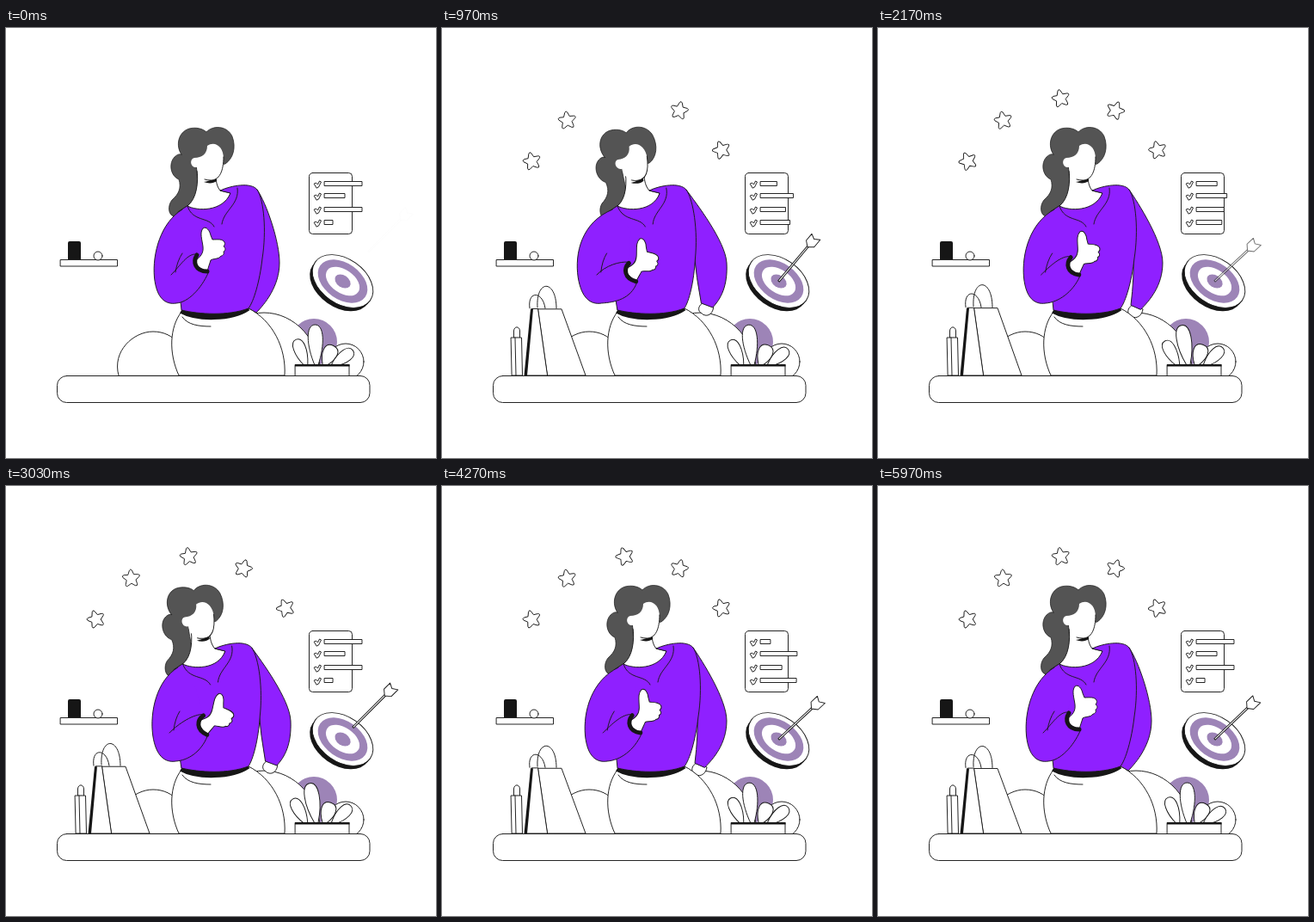
Write an HTML page that moves like this. It is 500 px wide and 500 px high and loops after 6 s.

```html
<!DOCTYPE html>
<html>
<head>
<meta charset="utf-8">
<style>
html, body { margin: 0; width: 100%; height: 100%; overflow: hidden; background: #fff; }
svg { display: block; width: 100vw; height: 100vh; }
svg * { stroke-linejoin: round; stroke-linecap: round; }
.w { fill: #fff; stroke: #1a1a1a; stroke-width: .95; }
.l { fill: none; stroke: #1a1a1a; stroke-width: .95; }
.p { fill: #8f20ff; stroke: #1a1a1a; stroke-width: .95; }
.pf { fill: #8f20ff; }
.h { fill: #545454; stroke: #1a1a1a; stroke-width: .7; }
.k { fill: #161616; }
.v { fill: #9d84b7; }
</style>
</head>
<body>
<svg viewBox="0 0 500 500">
  <!-- backdrop -->
  <path class="w" d="M131 404C123 376 148 353 171 353C196 353 213 374 211 404Z"/>
  <circle class="v" cx="358" cy="365" r="27"/>
  <path class="w" d="M234 405A66 74 0 0 1 366 405Z"/>
  <circle class="w" cx="395" cy="388" r="21"/>

  <!-- shelf -->
  <rect class="w" x="63.5" y="269.5" width="66" height="7.5"/>
  <path class="k" d="M72 269V250Q72 248 74 248H85Q87 248 87 250V269Z"/>
  <circle class="w" cx="107" cy="265" r="5"/>

  <!-- checklist -->
  <rect class="w" x="352.5" y="168.5" width="50" height="71" rx="4"/>
  <g id="rows"></g>

  <!-- dartboard -->
  <g transform="translate(391.5 294.5) rotate(35)">
    <ellipse class="k" cx="-.2" cy="5" rx="39" ry="26"/>
    <ellipse class="w" rx="39" ry="26"/>
    <ellipse class="v" rx="32" ry="21"/>
    <ellipse fill="#fff" rx="22" ry="13.5"/>
    <ellipse class="v" rx="10" ry="7"/>
  </g>
  <g id="arrow">
    <rect class="w" y="-1" width="56" height="2"/>
    <path class="w" d="M52 0L57 -6L67 -6L64 0L68 6L57 6Z"/>
  </g>

  <g id="stars"></g>

  <g id="bottle">
    <path class="w" d="M83.5 -44V-52C84 -57.5 90 -57.5 90.5 -52V-44Z"/>
    <path class="w" d="M80.5 -44H92.5L93.5 0H81.5Z"/>
    <path class="l" d="M85 -44L86 0"/>
  </g>
  <g id="bag">
    <path class="w" d="M104 -75L97 0H123L112 -75Z"/>
    <path class="w" d="M112 -75H139L167 0H123Z"/>
    <path class="k" d="M103 -75L95.5 0H99L106 -75Z"/>
    <path class="l" d="M102 -76C99 -96 117 -96 120 -76M111 -77C109 -109 133 -109 133 -76"/>
  </g>

  <!-- person -->
  <g class="lean">
    <g class="head">
      <path class="h" d="M204 147C197 137 200 121 213 117C221 115 229 117 233 121C240 113 257 113 263 126C268 139 264 152 255 158L222 165C222 180 227 196 214 206C208 212 202 219 196 219C188 218 188 206 193 200C201 193 204 186 201 176C191 172 189 157 196 150C199 147 202 146 204 147Z"/>
    </g>
    <path class="w" id="fist"/>
    <path class="p" id="rightArm"/>
  </g>
  <path class="w" d="M204 330C190 348 189 378 201 404H324C326 372 310 340 282 326Z"/>
  <path class="l" d="M205 336C211 345 224 347 238 347"/>
  <path fill="none" stroke="#161616" stroke-width="8" style="stroke-linecap:butt" d="M204 328C222 338 262 338 281 325"/>
  <g class="lean">
    <path class="w" d="M222 162C224 180 222 198 211 207C222 217 255 214 261 192L249 189C245 184 244 178 244 170Z"/>
    <path class="p" d="M211 207C222 213 252 214 261 192L249 189C262 183 285 179 292 188C300 200 303 236 298 268C295 295 288 318 282 326C258 335 225 333 204 328L203 318C190 280 195 225 200 214Z"/>
    <path class="l" d="M269 186C272 205 253 212 251 228M211 207C217 226 236 219 242 231"/>
    <g class="head">
      <path class="k" d="M230 179C238 178 243 175 245 169V178C241 181 235 181 230 179Z"/>
      <path fill="#fff" d="M234 137C243 131 253 138 253 152C253 167 248 177 238 177C228 177 222 170 222 162C214 163 213 152 219 151C228 151 234 146 234 137Z"/>
      <path class="l" d="M253 150C253 167 248 177 238 177Q234 177 231 176"/>
    </g>
    <path class="pf" id="sleeve"/>
    <path class="l" id="sleeveLine"/>
    <path class="l" id="folds"/>
    <g id="hand">
      <path class="w" d="M221 270C226 266 230 262 229 254C228 246 225 238 229 233C233 230 237 236 238 241L240 246C246 246 252 245 254 249C255 251 254 253 253 254C256 256 255 259 253 260C254 263 252 265 250 265C248 269 240 268 238 270C237 274 235 278 234 284L221 276Z"/>
      <path fill="none" stroke="#161616" stroke-width="5" d="M222 264C217 272 220 283 234 283"/>
    </g>
  </g>

  <!-- plant and table -->
  <g id="leaves"></g>
  <rect class="w" x="336.5" y="391.5" width="62.5" height="14"/>
  <path class="k" d="M336 391H399.5V393.5H336Z"/>
  <rect class="w" x="59.5" y="404.5" width="363.5" height="31" rx="11"/>
</svg>
<script>
const LOOP = 6000;
const $ = id => document.getElementById(id);
const set = (el, attrs) => { for (const k in attrs) el.setAttribute(k, attrs[k]); return el; };
const make = (parent, tag, attrs) =>
  parent.appendChild(set(document.createElementNS('http://www.w3.org/2000/svg', tag), attrs));
const clamp = x => Math.max(0, Math.min(1, x));
const wave = (t, period) => (1 - Math.cos(t / period * 2 * Math.PI)) / 2;
const backOut = x => { const u = clamp(x) - 1; return 1 + u * u * (2.2 * u + 1.2); };

// time, lean, elbow dx, hand dx, hand dy, hand turn, right arm reach
const poses = [
  [0, 1, 0, 0, 0, 0, 0],
  [970, 0, -12, 0, 14, 14, 1],
  [2170, 1, -3, 3, 5, 7, .6],
  [3030, .22, 0, 12, 11, 24, 1],
  [4270, 1, -6, 0, 5, 7, .6],
  [5270, .44, -8, 0, 9, 11, 0],
  [5970, 1, 0, 0, 0, 0, 0],
  [LOOP, 1, 0, 0, 0, 0, 0]
];
function poseAt(t) {
  const i = poses.findIndex(p => p[0] > t), a = poses[i - 1], b = poses[i];
  const f = wave((t - a[0]) / (b[0] - a[0]), 2);
  return a.map((v, j) => v + (b[j] - v) * f);
}

// y, bar end at rest, bar end at mid cycle
const bars = [[181, 414, 380], [195, 394, 414], [211, 414, 394], [226, 380, 414]].map(([y, from, to]) => {
  make($('rows'), 'path', { class: 'l', d: `M358.5 ${y}l2 -1 2 2 2 -4 2 1 -3 6 -2 1z` });
  const el = make($('rows'), 'rect', { class: 'w', x: 370.5, y: y - 2.5, height: 5 });
  return { el, from, to };
});

function starPath() {
  const at = (r, deg) => [r * Math.sin(deg * Math.PI / 180), -r * Math.cos(deg * Math.PI / 180)].map(v => v.toFixed(2)).join(' ');
  let d = '';
  for (let a = 0; a < 360; a += 72)
    d += `${a ? 'L' : 'M'}${at(6, a - 36)}L${at(10, a - 9)}Q${at(12.5, a)} ${at(10, a + 9)}`;
  return d + 'Z';
}
// x, y, entry time, tilt
const stars = [[104.5, 155, 150, -18], [145.5, 107.5, 250, -8], [212.5, 82, 1000, -14], [276, 96, 610, 16], [325, 142, 480, -18]]
  .map(([x, y, start, tilt]) => ({ x, y, start, tilt, el: make($('stars'), 'path', { class: 'w', d: starPath() }) }));

// base x, length, width, angle
const leaves = [[349, 32, 9, -25], [361, 47, 11, -6], [370, 25, 11, 22], [380, 29, 9, 50]]
  .map(([x, h, w, angle]) => ({ x, angle, el: make($('leaves'), 'path', {
    class: 'w', d: `M-2 0C${-w} ${-h * .5} ${-w} ${-h} 0 ${-h}S${w} ${-h * .5} 2 0Z` }) }));

function drawArrow(t) {
  const p = t % 2333, hit = 890;
  const away = 30 * (1 - Math.min(1, p / hit) ** 2.1);
  const s = p - hit;
  const turn = s < 0 ? -45 : -43 - 12 * Math.sin(s / 50) * Math.exp(-s / 150);
  set($('arrow'), {
    transform: `translate(${391.5 + away} ${294.5 - away * 1.15}) rotate(${turn})`,
    opacity: Math.min(clamp(p / 150), clamp((2333 - p) / 250))
  });
}

function drawPerson(t) {
  const [, lean, e, hx, hy, turn, reach] = poseAt(t);
  const k = .057 * (1 - lean);
  document.querySelectorAll('.lean').forEach(g => set(g, { transform: `matrix(1 0 ${k} 1 ${-330 * k} 0)` }));
  document.querySelectorAll('.head').forEach(g => set(g, { transform: `rotate(${-5 * (1 - lean)} 240 200)` }));

  // the elbow stays out while the shoulders lean
  const side = 318 + 13 * Math.min(1, reach * 1.7) + 57 * k;
  const ox = 291 + 24 * reach, oy = 331 - 6 * reach;
  const ix = 282 + 20 * reach, iy = 326 - 6 * reach;
  set($('rightArm'), { d: `M292 188C303 204 ${side} 248 ${side} 273C${side} 300 ${ox + 10} ${oy - 10} ${ox} ${oy}L${ix} ${iy}Q298 290 297 262Z` });
  set($('fist'), { d: `M${ix + 1} ${iy}c-5 4 -6 9 -1 12c4 4 12 3 14 -7z`, opacity: clamp(reach * 4) });

  // the forearm ends at the cuff, so it follows the hand
  const a = turn * Math.PI / 180;
  const onHand = (x, y) => [
    240 + hx + (x - 240) * Math.cos(a) - (y - 256) * Math.sin(a),
    256 + hy + (x - 240) * Math.sin(a) + (y - 256) * Math.cos(a)];
  const [bx, by] = onHand(235, 285), [cx, cy] = onHand(221, 263);
  const outer = `M205 211C${180 + e} 226 ${170 + e} 262 ${172.5 + e} 290C${175 + e} 314 ${185 + e} 322 ${198 + e} 320C${212 + e * .8} 319 ${bx - 8} ${by + 18} ${bx} ${by}`;
  set($('sleeve'), { d: `${outer}L${cx} ${cy}L225 235Z` });
  set($('sleeveLine'), { d: outer });
  const f = e * .8;
  set($('folds'), { d: `M${cx} ${cy}C${cx - 10} ${cy - 1} ${203 + f} 276 ${192 + f} 287M${205 + f} 262Q${199 + f} 271 ${197 + f} 284` });
  set($('hand'), { transform: `translate(${hx} ${hy}) rotate(${turn} 240 256)` });
}

function draw(t) {
  const swing = wave(t, 3000);
  bars.forEach(b => set(b.el, { width: b.from + (b.to - b.from) * swing - 370.5 }));

  stars.forEach((s, i) => {
    const size = backOut((t - s.start) / 350);
    set(s.el, {
      transform: `translate(${s.x} ${s.y}) rotate(${s.tilt + 5 * Math.sin(t / LOOP * 4 * Math.PI + i)}) scale(${.95 * size})`,
      visibility: t > s.start ? 'visible' : 'hidden'
    });
  });

  leaves.forEach(l => set(l.el, {
    transform: `translate(${l.x} 392) rotate(${l.angle + 4.2 * Math.cos((t + 450) / LOOP * 2 * Math.PI)})`
  }));

  const breathe = 1 + .045 * (1 - wave(t - 2200, LOOP));
  set($('bag'), { transform: `translate(0 404) scale(1 ${breathe * backOut((t - 60) / 650)})`, visibility: t > 60 ? 'visible' : 'hidden' });
  set($('bottle'), { transform: `translate(0 404) scale(1 ${backOut((t - 160) / 600)})`, visibility: t > 160 ? 'visible' : 'hidden' });

  drawArrow(t);
  drawPerson(t);
}

const began = performance.now();
function tick() {
  draw((performance.now() - began) % LOOP);
  requestAnimationFrame(tick);
}
draw(0);
requestAnimationFrame(tick);
</script>
</body>
</html>
```
